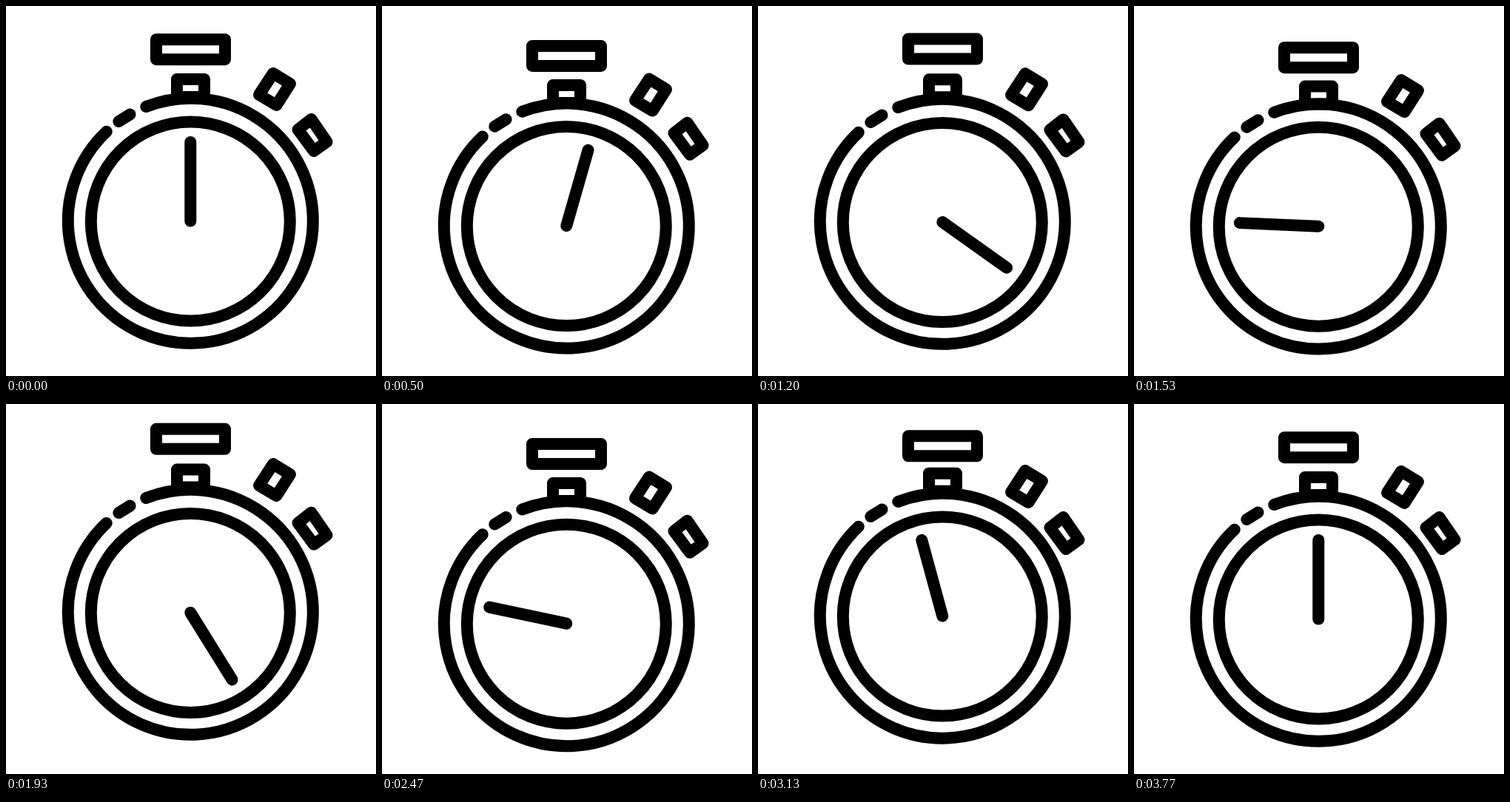
An HTML page for the animation above (5.03 s loop, 500x500 px).

```html
<!DOCTYPE html>
<html lang="en">
<head>
<meta charset="utf-8">
<title>Stopwatch</title>
<style>
  html, body { margin: 0; width: 100%; height: 100%; overflow: hidden; background: #fff; }
  svg { display: block; width: 100%; height: 100%; }
  g { fill: none; stroke: #000; stroke-width: 16; stroke-linecap: round; stroke-linejoin: round; }
</style>
</head>
<body>
<svg viewBox="0 0 500 500">
  <g id="cap"><rect x="203" y="45.2" width="93" height="27"/></g>
  <g id="neck"><rect x="231" y="99" width="37" height="24"/></g>
  <g id="upper"><path d="M361 91 384 105 365.5 134 342 120Z"/></g>
  <g id="lower"><path d="M412.500 153 433.500 183.500 416 196 394.500 167Z"/></g>
  <g id="rim">
    <path d="M189.300 136A165.500 165.500 0 1 1 135.800 169.800"/>
    <path d="M152.300 156 167.600 146.500"/>
  </g>
  <g id="dial">
    <circle cx="249.300" cy="291" r="134.500"/>
    <path id="hand" d="M249.300 290.500V184"/>
  </g>
</svg>
<script>
  const LOOP = 5030, STEP = 40, END = 3760;
  const TURN = 720, EASE = [-113, 2484, 678, 3834]; // time handles of the spin curve
  const BEAT = 480, SWING = [0, 8, -8, 10.5, -10.5, 8, -9.5, 0]; // one turning point per beat

  // Every part follows the same bob with its own strength and delay
  const PARTS = [
    { id: 'cap',   gain: 1.1,  lag: 30,  settle: 3200 },
    { id: 'neck',  gain: 1,    lag: 15,  settle: 3375 },
    { id: 'upper', gain: 0.95, lag: 15,  settle: 3180 },
    { id: 'lower', gain: 0.6,  lag: 10,  settle: 3130 },
    { id: 'rim',   gain: 0.85, lag: 0,   settle: 3360 },
    { id: 'dial',  gain: 0.82, lag: -10, settle: 3370 }
  ];

  const el = id => document.getElementById(id);
  const mix = (a, b, p) => a + (b - a) * p;
  const smooth = p => (1 - Math.cos(Math.PI * p)) / 2;

  function bob({ gain, lag, settle }, t) {
    if (t <= lag || t >= settle) return 0;
    const last = SWING.length - 2;
    const i = Math.min(last, Math.floor((t - lag) / BEAT));
    const from = lag + i * BEAT;
    const to = i < last ? from + BEAT : settle;
    return gain * mix(SWING[i], SWING[i + 1], smooth((t - from) / (to - from)));
  }

  function spin(t) {
    if (t <= 0 || t >= END) return 0;
    const [a, b, c, d] = EASE;
    let lo = 0, hi = 1;
    for (let i = 0; i < 30; i++) {
      const s = (lo + hi) / 2, r = 1 - s;
      const x = a * r ** 3 + 3 * b * r * r * s + 3 * c * r * s * s + d * s ** 3;
      if (x < t) lo = s; else hi = s;
    }
    return TURN * lo * lo * (3 - 2 * lo);
  }

  // 25 poses a second shown on a 30 Hz clock
  function poseTime(ms) {
    const tick = Math.floor((ms + 5) * 0.03);
    return Math.min(END, Math.floor(tick * 5 / 6) * STEP);
  }

  function draw(now) {
    const t = poseTime(now % LOOP);
    for (const part of PARTS) {
      el(part.id).setAttribute('transform', `translate(0 ${bob(part, t).toFixed(2)})`);
    }
    el('hand').setAttribute('transform', `rotate(${spin(t).toFixed(2)} 249.3 290.5)`);
  }

  let start;
  function frame() {
    const now = performance.now();
    start ??= now;
    draw(now - start);
    requestAnimationFrame(frame);
  }
  draw(0);
  requestAnimationFrame(frame);
</script>
</body>
</html>
```
